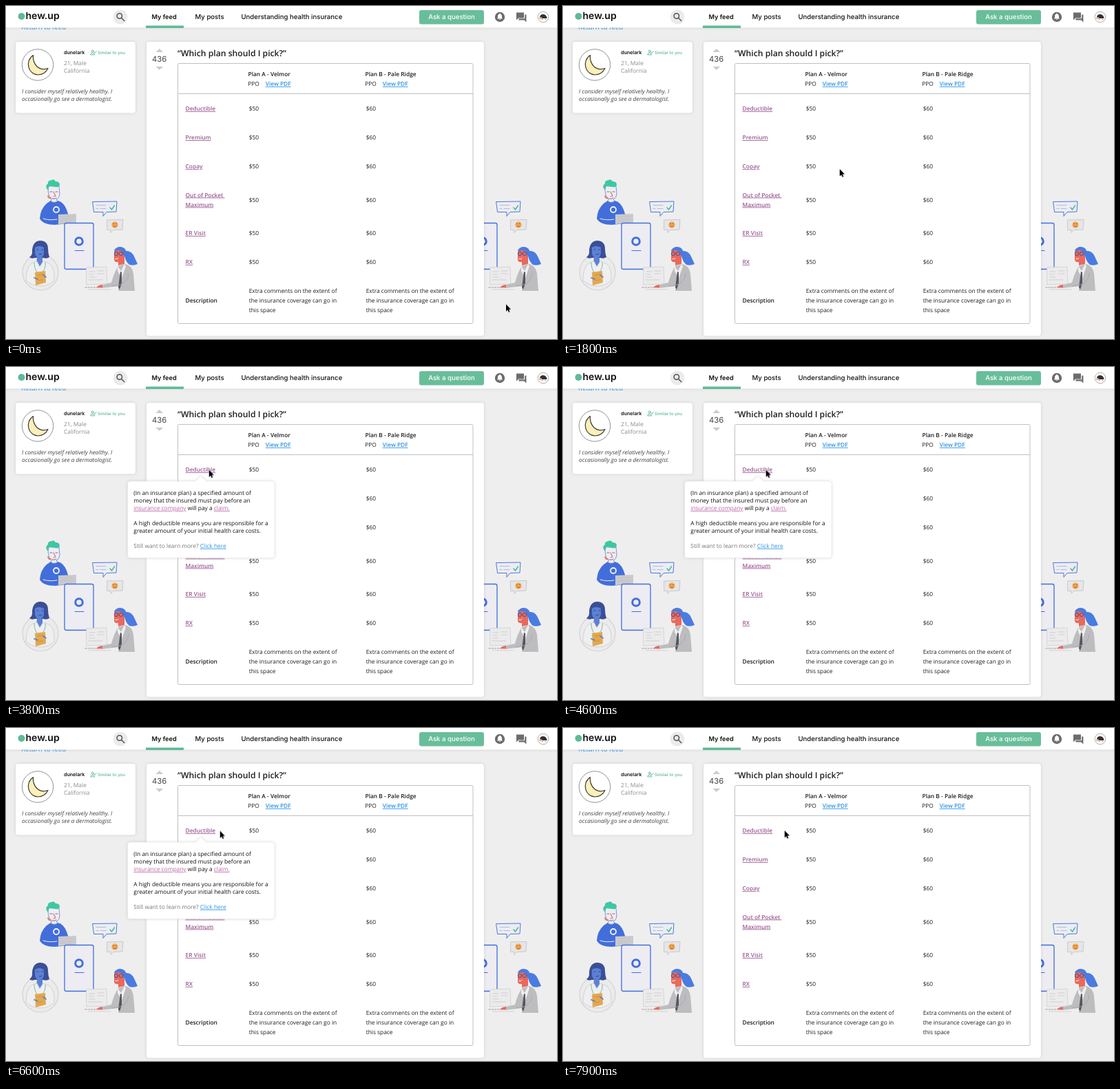
An HTML page for the animation above (8 s loop, 800 px wide and 484 px high).

```html
<!DOCTYPE html>
<html lang="en">
<head>
<meta charset="utf-8">
<title>Plan comparison</title>
<style>
html, body { margin: 0; width: 100%; height: 100%; overflow: hidden; background: #efeeef; }
svg { display: block; width: 800px; height: 484px; }
text { font: 8.4px "Open Sans", "Noto Sans", sans-serif; fill: #1d1d1d; white-space: pre; text-rendering: geometricPrecision; }
.nav, .nav text { font-family: Inter, "Open Sans", sans-serif; font-weight: 500; font-size: 9.6px; fill: #111; }
.b { font-weight: 600; }
.u, .term { text-decoration: underline; text-decoration-thickness: .6px; text-underline-offset: 1.5px; }
.u { fill: #2a93e6; }
.term { fill: #9a5a92; }
.tip text { fill: #111; }
.tip .term { fill: #b766a4; }
.tip .u { fill: #2a93e6; }
.note text { font-size: 8.3px; font-style: italic; fill: #444; }
.soft { fill: #8a8a8a; }
.card { fill: #fff; filter: drop-shadow(0 .8px 2px #0002); }
.ico { fill: #6c6c6c; }
.ln { fill: none; stroke-linecap: round; stroke-linejoin: round; }
.tip { opacity: 0; animation: tip 8s step-end infinite; }
.cursor { animation: move 8s steps(1) infinite; }
@keyframes tip {
  0% { opacity: 0; }
  43.75% { opacity: 1; }
  87.5%, 100% { opacity: 0; }
}
/* one step every 100 ms */
@keyframes move {
  0% { transform: translate(726px, 433.5px); }
  13.75% { transform: translate(726px, 433.5px); }
  15% { transform: translate(690px, 408px); animation-timing-function: steps(6); }
  22.5% { transform: translate(401.7px, 237px); animation-timing-function: steps(4); }
  27.5% { transform: translate(330px, 180px); animation-timing-function: steps(5); }
  33.75% { transform: translate(300px, 154px); animation-timing-function: steps(3); }
  37.5% { transform: translate(295.7px, 150.5px); }
  42.5% { transform: translate(294.7px, 149.5px); }
  62.5% { transform: translate(296px, 150px); }
  77.5% { transform: translate(296px, 150px); animation-timing-function: steps(4); }
  82.5% { transform: translate(310.7px, 149.5px); animation-timing-function: steps(6); }
  90%, 100% { transform: translate(321.7px, 149px); }
}
</style>
</head>
<body>
<svg viewBox="0 0 800 484">
  <defs>
    <g id="team" class="ln">
      <!-- man with laptop -->
      <path d="M49 309q1-14 10-22l6-4h10q9 2 13 13l4 12-1 8-20 2q-17 0-22-9z" fill="#426edb"/>
      <path d="M61 266q0-5 6-6l10 2 1 11q-1 7-5 8l2 3q-5 3-10 0l1-3q-5-5-5-15z" fill="#efedf0" stroke="#4a70cf" stroke-width=".7"/>
      <path d="M60 267q-4-6 1-9-1-4 5-5 4-2 6 2 6 0 6 5-1 4-6 3l-9-1z" fill="#3fc7a4"/>
      <path d="M64 270h3m5 0h3M67 280q4 1 6-1" stroke="#3656a8" stroke-width=".8"/>
      <path d="M69 270l3 6-3 1" stroke="#e9705f" stroke-width="1.2"/>
      <path d="M61 276q1 4 4 3" stroke="#e9705f" stroke-width="1.8"/>
      <path d="M54 309q9 3 20 1" stroke="#f4eef0" stroke-width="1"/>
      <circle cx="73" cy="296" r="4" stroke="#f5f4fa" stroke-width="1.8"/>
      <path d="M76 303l26-1v13l-26 2z" fill="#cacacd"/>
      <path d="M79 306h19m-19 4h18m-18 3h16" stroke="#b9b9bd" stroke-width=".5"/>
      <!-- phone -->
      <rect x="85" y="315.500" width="42" height="67" rx="2.500" fill="#ececf2" stroke="#426edb" stroke-width="1.300"/>
      <circle cx="106" cy="342" r="5.300" stroke="#426edb" stroke-width="3"/>
      <path d="M100 355.500h13" stroke="#426edb" stroke-width="1.200"/>
      <!-- chat bubbles -->
      <path d="M126 284.500l35-.5-1 15-14 .5-5 6v-6h-13z" fill="#ececf2" stroke="#4e78d8" stroke-width="1"/>
      <path d="M131 289.500h14m-14 5h3m3 0h8" stroke="#9fb0dc" stroke-width=".8"/>
      <path d="M151 293l2.500 3 4-6" stroke="#3fb98f" stroke-width="1.400"/>
      <path d="M147 311l23-.5-1 14.500-13 .5-4 4v-4h-5z" fill="#e6e6e8" stroke="#c4c4c8" stroke-width=".9"/>
      <circle cx="158" cy="318" r="4.600" fill="#f0a64c"/>
      <path d="M156 316.500h.1m3.600 0h.1" stroke="#5b3d22" stroke-width="1.200"/>
      <path d="M156 320q2 1.500 4 0" stroke="#d5513f" stroke-width="1"/>
      <!-- doctor -->
      <circle cx="50" cy="387" r="26" fill="#ebebec" stroke="#d2d2d4" stroke-width="1.200"/>
      <path d="M34 365q5-3 4-10 1-13 11-14 12 0 12 12 0 6 2 12-4 3-9 1H42q-5 2-8-1z" fill="#3a4f96"/>
      <path d="M42 351q6-4 13 0v9q-2 7-6 7-6-1-7-8z" fill="#5c80d5"/>
      <path d="M45 354h2m5 0h2m-6 7q2 1 4-1" stroke="#273873" stroke-width=".8"/>
      <path d="M45 366h8v9l-5 4-4-5z" fill="#5c80d5"/>
      <path d="M29 399q0-19 8-25l8-3 4 8 5-8 10 4q7 7 6 24-8 8-20 8t-21-8z" fill="#efeff0" stroke="#cbcbce" stroke-width=".8"/>
      <path d="M41 373q0 8 4 14m12-14q1 7-3 12" stroke="#62b79c" stroke-width=".9"/>
      <path d="M42 387l15-2 1 17-15 4z" fill="#e3a84f"/>
      <path d="M41 395l5 2m8-6l4 3" stroke="#5c80d5" stroke-width="1.800"/>
      <path d="M46 391l8-1m-7 9l6-1" stroke="#c38730" stroke-width=".6"/>
      <!-- screen and keyboard -->
      <path d="M117 380l29-1 1 25-30 1z" fill="#ebebec" stroke="#cfcfd2" stroke-width=".8"/>
      <path d="M121 386h8m-8 4h6m-6 4h8m4-9h9m-9 4h9m-22 9h20" stroke="#c8c8cc" stroke-width=".8"/>
      <path d="M115 409h22" stroke="#c5b2b3" stroke-width="1.600" stroke-dasharray="2 2.200"/>
      <!-- woman at desk -->
      <path d="M173 356q9-1 13 8l5 11q-6 3-12 1-6-5-7-14z" fill="#4a7be0"/>
      <path d="M157 355q5-7 13-4 6 3 4 11l-4 5-11-8z" fill="#4a7be0"/>
      <path d="M157 357q6-4 12 0l3 8v10l-9 2v-5q-5 1-6-3z" fill="#e9695c"/>
      <circle cx="160" cy="360" r="2.700" stroke="#3654a3" stroke-width=".9"/>
      <circle cx="167" cy="360" r="2.700" stroke="#3654a3" stroke-width=".9"/>
      <path d="M159 367.500q3 1 4-1" stroke="#fff" stroke-width="1"/>
      <path d="M138 406l15-4q4-15 10-24l10-3q10 2 12 14l2 25h-24l1-7-25 3z" fill="#bdbdbf"/>
      <path d="M162 378l5 7 5-10 2 3-6 18-6-11z" fill="#efeff0"/>
      <path d="M166 386l2 1v16l-3 9-2-3z" fill="#565660"/>
      <path d="M178 389q-1 11-12 16l-12 2" stroke="#a8a8ab" stroke-width=".9"/>
      <path d="M140 405l-5 1-4 3 9 .5z" fill="#e9695c"/>
      <path d="M120 412h32" stroke="#cccccf" stroke-width=".9"/>
    </g>
    <path id="bubble" d="M0 0h11v8H3L0 11z"/>
    <g id="plan">
      <text x="0" y="116">PPO</text>
      <text class="b u" x="25.500" y="116">View PDF</text>
      <text x="1.500" y="416.500">Extra comments on the extent of</text>
      <text x="1.500" y="430.500">the insurance coverage can go in</text>
      <text x="1.500" y="444.500">this space</text>
    </g>
  </defs>

  <rect width="800" height="484" fill="#efeeef"/>
  <use href="#team"/>
  <use href="#team" x="586"/>
  <text x="22" y="33.500" style="font-size:9.700px;fill:#2a93e6">Return to feed</text>

  <g class="nav">
    <rect class="card" x="-5" y="-5" width="810" height="36.500"/>
    <circle cx="22.500" cy="15" r="5" fill="#5fba96"/>
    <text x="28.500" y="19" style="font-size:14px;font-weight:600">hew.up</text>
    <circle cx="166" cy="16" r="10.500" fill="#ebebeb"/>
    <g class="ln" stroke="#555" stroke-width="1.600"><circle cx="164.800" cy="14.500" r="3.700"/><path d="M167.700 17.500l4 4"/></g>
    <text x="211.500" y="19" style="font-size:9.200px;font-weight:600">My feed</text>
    <text x="274.500" y="19">My posts</text>
    <text x="341.500" y="19">Understanding health insurance</text>
    <rect x="203" y="28.500" width="55" height="3.500" fill="#5dba95"/>
    <rect x="600" y="6" width="94" height="20.500" rx="3" fill="#69be9a"/>
    <text x="647" y="19.300" text-anchor="middle" style="fill:#fff">Ask a question</text>
    <circle class="ico" cx="717" cy="16" r="7.200"/>
    <path fill="#fff" d="M713 18.500l1-1.500v-2.500q.2-2.500 2.300-3v-.8h1.400v.8q2.100.5 2.300 3V17l1 1.500zm2.800.8h2.400q-1.200 1.800-2.400 0z"/>
    <use class="ico" href="#bubble" x="741" y="9.500"/>
    <path class="ico" d="M753.200 12.500h2.200v11l-3-3h-8v-2.200h8.800z"/>
    <circle cx="780" cy="16" r="7.800" fill="#fff" stroke="#777" stroke-width=".6"/>
    <path d="M775 17q0-5 5-5 5 .5 5.500 6h-8z" fill="#33302f"/>
    <path d="M774 17.500q2-3 4.500 0l-.5 1.500h-4z" fill="#e0b6a0"/>
    <path d="M778 19.500h1.500m3 0h1.500" stroke="#c75b4d" stroke-width="1.200"/>
  </g>

  <rect class="card" x="14" y="52" width="174" height="103.500" rx="4"/>
  <circle cx="46" cy="85.500" r="22.700" fill="#fff" stroke="#777" stroke-width=".8"/>
  <path d="M39.500 71.500C27 80 32 99 46 100q10.500 0 15-9.500-9 3.500-16-2.500-6.500-7-5.500-16.500z" fill="#fbf0b8" stroke="#3c3a36" stroke-width="1.200" stroke-linejoin="round"/>
  <g class="nav">
    <text x="84" y="70" style="font-size:7.100px;font-weight:600">dunelark</text>
    <text x="133" y="69.500" style="font-size:6.200px;fill:#56b68f">Similar to you</text>
    <g class="ln" stroke="#56b68f" stroke-width=".9"><circle cx="125.700" cy="65.500" r="1.500"/><path d="M122.800 70.500q.5-2.500 3-2.500t3 2.500zm5.200-3.500l1.200 1.200 2-2.500"/></g>
  </g>
  <text class="soft" x="84" y="85.800">21, Male</text>
  <text class="soft" x="84" y="97">California</text>
  <g class="note">
    <text x="23" y="127.300">I consider myself relatively healthy. I</text>
    <text x="23" y="138.300">occasionally go see a dermatologist.</text>
  </g>

  <rect class="card" x="204" y="52" width="490" height="427.500" rx="4"/>
  <path d="M217.500 67l5.300-5 5.300 5zm0 21h10.600l-5.300 5z" fill="#cbcbcb"/>
  <text class="nav" x="222.700" y="81.300" text-anchor="middle" style="font-size:11.300px;font-weight:400;fill:#444">436</text>
  <text class="b" x="249" y="72.500" style="font-size:12.200px">“Which plan should I pick?”</text>
  <rect x="249.500" y="83.500" width="428.500" height="378" rx="2" fill="none" stroke="#c0c0c0"/>
  <path d="M249.500 127.500H678" stroke="#c0c0c0"/>
  <text class="b" x="351.500" y="102">Plan A - Velmor</text>
  <text class="b" x="521.500" y="102">Plan B - Pale Ridge</text>
  <use href="#plan" x="351.200"/>
  <use href="#plan" x="521.200"/>
  <g id="rows"></g>
  <text class="b" x="260.500" y="430.500">Description</text>

  <g class="tip">
    <path class="card" d="M180.500 166H275l8-7.500 8 7.500h95q4 0 4 4v103.500q0 4-4 4H180.500q-4 0-4-4V170q0-4 4-4z" stroke="#e2e2e2" stroke-width=".5"/>
    <text x="185.300" y="185.500">(In an insurance plan) a specified amount of</text>
    <text x="185.300" y="196.700">money that the insured must pay before an</text>
    <text x="185.300" y="207.900"><tspan class="term">insurance company</tspan> will pay a <tspan class="term">claim.</tspan></text>
    <text x="185.300" y="230.200">A high deductible means you are responsible for a</text>
    <text x="185.300" y="241.400">greater amount of your initial health care costs.</text>
    <text x="185.300" y="262.800" style="fill:#777">Still want to learn more? <tspan class="u">Click here</tspan></text>
  </g>

  <path class="cursor" d="M0 0V10.400L2.300 8.300 3.900 11.700 5.500 11 4.100 7.600H7.200z" stroke="#fff" stroke-width=".9" paint-order="stroke"/>
</svg>
<script>
const label = (x, y, s, cls = "") => `<text class="${cls}" x="${x}" y="${y}">${s}</text>`;
const terms = [["Deductible", 152], ["Premium", 194], ["Copay", 236], ["Out of Pocket ", 277.5, "Maximum"], ["ER Visit", 333], ["RX", 375]];
document.getElementById("rows").innerHTML = terms.map(([name, y, more]) => {
  const mid = more ? y + 7 : y;
  return label(260.5, y, name, "b term") + (more ? label(260.5, y + 14, more, "b term") : "") +
    label(352.7, mid, "$50") + label(522.7, mid, "$60");
}).join("");
</script>
</body>
</html>
```
